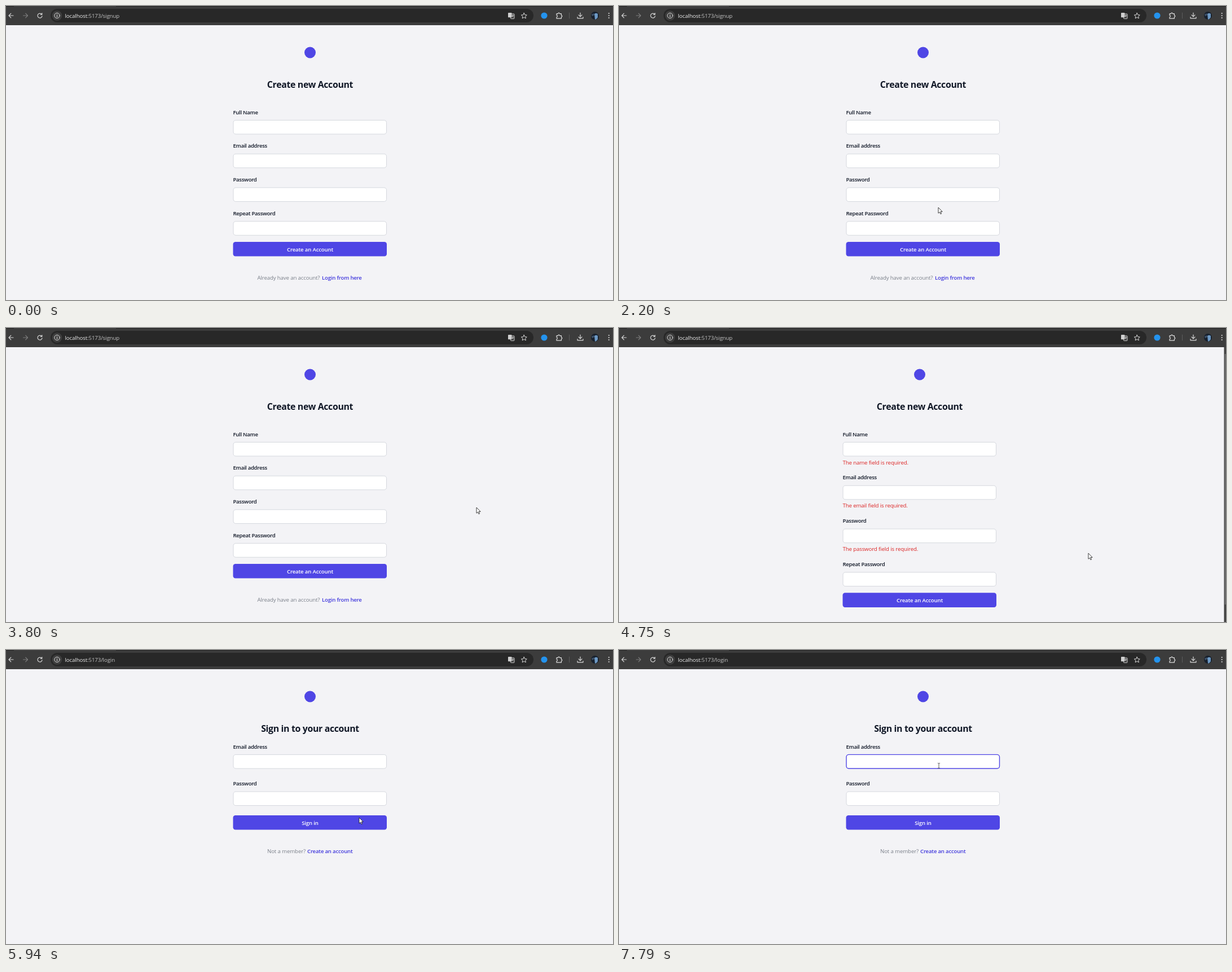
An HTML page for the animation above (8000 ms loop, 1076 by 521 pixels).

```html
<!DOCTYPE html>
<html lang="en">
<head>
<meta charset="utf-8">
<title>Sign up</title>
<style>
  html, body { margin: 0; width: 100%; height: 100%; overflow: hidden; background: #f3f3f6; }
  svg { display: block; width: 1076px; height: 521px; }
  text { font: 400 9.7px "Open Sans", "Noto Sans", sans-serif; letter-spacing: -.15px; white-space: pre; }
  .title { font-weight: 700; font-size: 15.9px; letter-spacing: -.35px; fill: #111827; text-anchor: middle; }
  .label { font-weight: 600; font-size: 9.6px; letter-spacing: -.3px; fill: #111827; }
  .caption { font-weight: 600; font-size: 9.6px; letter-spacing: -.16px; fill: #fff; text-anchor: middle; }
  .error { fill: #dc2626; }
  .note { fill: #7b808a; }
  .link { font-weight: 600; font-size: 9.6px; letter-spacing: -.2px; fill: #4038dd; }
  .input { fill: #fff; stroke: #d5d8de; }
  .input.focus { stroke: #4f46e5; stroke-width: 1.4; }
  .button { fill: #4f46e5; }
  .button.hover { fill: #6366f1; }
  .url { letter-spacing: -.12px; fill: #c4c4c4; }
  .url tspan { fill: #ededed; }
  .icon { fill: none; stroke: #dadada; stroke-width: 1.2; stroke-linecap: round; stroke-linejoin: round; }
  .off { display: none; }
</style>
</head>
<body>
<svg viewBox="0 0 1076 521">
  <rect width="1076" height="521" fill="#f3f3f6"/>
  <g id="pages"></g>

  <g id="bar" class="off">
    <rect x="1072.5" y="34" width="4" height="487" fill="#424242"/>
    <rect id="thumb" x="1073.5" y="46" width="3" height="444" fill="#686868"/>
  </g>

  <g id="toolbar">
    <rect width="1076" height="34" fill="#3c3c3c"/>
    <path d="M0 0H14V1H0zM195 0H1076V1H195z" fill="#202020"/>
    <rect x="79" y="5" width="856" height="24" rx="12" fill="#282828"/>
    <circle cx="90.5" cy="17" r="8.8" fill="#3e3e3e"/>
    <g class="icon">
      <path d="M13 17H5.2M8.8 13.2L5 17l3.800 3.800"/>
      <path d="M30.500 17h7.800M34.700 13.200l3.800 3.800-3.800 3.800" stroke="#7c7c7c"/>
      <path d="M63.200 14.600a4 4 0 1 0 .8 3.300M63.800 12.600v2.600h-2.600"/>
      <circle cx="90.500" cy="17" r="4.600" stroke-width="1"/>
      <path d="M90.500 16.700v2.500M90.500 14.700v.1"/>
      <path d="M918.300 12.300l1.500 3.300 3.500.4-2.600 2.400.7 3.500-3.100-1.800-3.100 1.800.7-3.500-2.600-2.400 3.500-.4z" stroke-width="1"/>
      <rect x="894.500" y="14" width="6.500" height="8.500" rx=".8" stroke-width="1"/>
      <path d="M896.500 16.700h3.500M898.300 15.700v1M899.300 16.700q-.6 2.200-2.600 3.300M897.200 17.500q.8 1.700 2.400 2.500" stroke-width=".8"/>
      <path d="M976 13.600h2.600a1.400 1.400 0 0 1 2.800 0h3v3a1.400 1.400 0 0 1 0 2.800v2.800H976v-2.700a1.500 1.500 0 0 0 0-3z"/>
      <path d="M998.500 12v10" stroke="#5c5c5c" stroke-width="1"/>
      <path d="M1018 12v6.500M1015 15.800l3 3 3-3M1013 19.500v2.300h10v-2.300"/>
    </g>
    <rect x="890" y="12" width="6.500" height="8.300" rx=".8" fill="#cfcfcf"/>
    <circle cx="954" cy="17" r="5.600" fill="#2493ee"/>
    <circle cx="1044" cy="17" r="7" fill="#17202d"/>
    <path d="M1043 14a4 4 0 0 1 6 0v6q-2 3.500-5 3.700z" fill="#6d99c4"/>
    <path d="M1038 15l4-2 1 3-4 2z" fill="#40536a"/>
    <g fill="#dadada"><circle cx="1068.700" cy="13" r="1.100"/><circle cx="1068.700" cy="17" r="1.100"/><circle cx="1068.700" cy="21" r="1.100"/></g>
    <text class="url" x="104.500" y="20.800"><tspan>localhost</tspan>:5173/<tspan id="route" style="fill:inherit">signup</tspan></text>
  </g>

  <rect id="caret" class="off" x="411" y="191" width="1" height="13" fill="#111827"/>
  <circle id="press" class="off" r="8" fill="#e2d32c" opacity=".78"/>
  <g id="cursor" stroke="#111" stroke-width=".8" stroke-linejoin="round" fill="#fff">
    <path id="arrow" d="M0 0V10.200L2.400 8.200 4 11.700 5.600 11 4 7.400H7.200z"/>
    <path id="hand" d="M-1.200 1.200a1.100 1.100 0 0 1 2.200 0V5.400l3.600.8q1.400.4 1.200 2l-.6 3.400q-.2 1.400-.9 2.200H-.2q-.9-1.600-2.300-3.200t-1.500-2.600 1.600-.2l1.200 1z"/>
    <path id="beam" d="M-2-4.500Q0-4.500 0-3.500 0-4.500 2-4.500M0-3.500V3.500M-2 4.500Q0 4.500 0 3.500 0 4.500 2 4.500" fill="none" stroke="#333"/>
  </g>
</svg>

<script>
const LOOP = 8000, MAX_SCROLL = 21.6, LEFT = 402.5, WIDTH = 272.5, FIELD_H = 25.6;
const $ = id => document.getElementById(id);

const text = (cls, x, y, s) => `<text class="${cls}" x="${x}" y="${y}">${s}</text>`;
const box = (cls, y, stroke) => {
  const d = stroke ? .5 : 0;
  return `<rect class="${cls}" x="${LEFT + d}" y="${y + d}" width="${WIDTH - 2 * d}" height="${FIELD_H - 2 * d}" rx="4.200"/>`;
};

// Each page keeps its own hit areas, [kind, x, y, width, height].
function makePage(o) {
  const hits = [['button', LEFT, o.button, WIDTH, FIELD_H], ['link', o.linkX, o.note - 8, o.linkW, 17]];
  let html = `<circle cx="539" cy="82.500" r="10" fill="#4f46e5"/>` + text('title', 539, 144.6, o.title);
  o.fields.forEach((name, i) => {
    const y = o.top + i * o.step;
    html += text('label', LEFT, y + 3.6, name) + box('input', y + 13.9, true);
    hits.push(['input', LEFT, y + 13.9, WIDTH, FIELD_H]);
    if (o.errors && o.errors[i]) html += text('error', LEFT, y + 53.6, `The ${o.errors[i]} field is required.`);
  });
  html += box('button', o.button) + text('caption', 539, o.button + 17, o.caption);
  html += text('note', o.noteX, o.note + 3.6, o.ask) + text('link', o.linkX, o.note + 3.6, o.link);
  const g = document.createElementNS('http://www.w3.org/2000/svg', 'g');
  g.innerHTML = html;
  $('pages').append(g);
  return { g, hits, dx: o.errors ? -6 : 0, button: g.querySelector('.button'), input: g.querySelector('.input') };
}

const signup = {
  title: 'Create new Account', fields: ['Full Name', 'Email address', 'Password', 'Repeat Password'],
  top: 188, step: 59.75, button: 418, caption: 'Create an Account',
  note: 481, noteX: 445.5, ask: 'Already have an account?', linkX: 560, linkW: 73, link: 'Login from here'
};
const pages = {
  signup: makePage(signup),
  invalid: makePage({ ...signup, step: 76.85, button: 469.3, note: 532.2, errors: ['name', 'email', 'password'] }),
  login: makePage({
    title: 'Sign in to your account', fields: ['Email address', 'Password'],
    top: 171, step: 65.6, button: 293, caption: 'Sign in',
    note: 356, noteX: 463, ask: 'Not a member?', linkX: 534, linkW: 81, link: 'Create an account'
  })
};

const views = [[0, 'signup'], [1320, 'login'], [2140, 'signup'], [4030, 'invalid'], [5740, 'login']];
const routes = [[0, 'signup'], [1360, 'login'], [2200, 'signup'], [5800, 'login']];
const presses = [[1260, 1320], [2080, 2140], [2900, 3140], [5680, 5740], [7180, 7300]];

// Pointer path: time, x, y
const path = [
  [230, 1032, 530], [420, 985, 466], [600, 760, 438], [720, 640, 431], [960, 598, 474],
  [1680, 598, 474], [2060, 566, 357], [2360, 566, 357], [2640, 563, 443], [2820, 562, 433],
  [3170, 562, 433], [3400, 720, 452], [3560, 872, 490], [3800, 834, 318], [4030, 834, 318],
  [4750, 832, 399], [4840, 812, 412], [5070, 665, 468], [5300, 602, 504], [5550, 590, 506],
  [5740, 590, 506], [5940, 626, 297], [6200, 604, 330], [6470, 580, 354], [6520, 580, 354],
  [7000, 566, 250], [7200, 567, 205], [8000, 567, 205]
];

const current = (list, t) => list.filter(([at]) => at <= t).pop()[1];
const clamp = v => Math.min(1, Math.max(0, v));

function slope(i, k) {
  const a = path[i - 1], b = path[i], c = path[i + 1];
  if (!a || !c || (b[k] - a[k]) * (c[k] - b[k]) <= 0) return 0;
  return (c[k] - a[k]) / (c[0] - a[0]);
}

function pointer(t) {
  if (t < path[0][0]) return [path[0][1], path[0][2]];
  const i = Math.min(path.findLastIndex(p => p[0] <= t), path.length - 2);
  const a = path[i], b = path[i + 1], d = b[0] - a[0], u = (t - a[0]) / d;
  const ease = u * u * (3 - 2 * u);
  return [1, 2].map(k => a[k] + (b[k] - a[k]) * ease
    + d * u * (1 - u) * (slope(i, k) * (1 - u) - slope(i + 1, k) * u));
}

const show = (el, on) => el.classList.toggle('off', !on);

function draw(t) {
  const view = current(views, t), page = pages[view], invalid = view === 'invalid';
  const s = 1 - clamp((t - 4840) / 180);
  const scroll = invalid ? MAX_SCROLL * (1 - s * s) : 0;
  const [x, y] = pointer(t);

  for (const name in pages) show(pages[name].g, name === view);
  page.g.setAttribute('transform', `translate(${page.dx} ${-scroll})`);
  show($('bar'), invalid);
  $('thumb').setAttribute('y', 46 + scroll * .91);
  $('route').textContent = current(routes, t);

  // The pointer state refreshes shortly after the last page change.
  const settled = t < 5740 || t > 5975;
  const hit = settled && page.hits.find(([, hx, hy, w, h]) =>
    x >= hx + page.dx && x <= hx + page.dx + w && y >= hy - scroll && y <= hy - scroll + h);
  const kind = hit ? hit[0] : '';
  page.button.classList.toggle('hover', kind === 'button');
  page.input.classList.toggle('focus', t >= 7220 && view === 'login');
  show($('caret'), t >= 7280 && t < 7790);

  show($('hand'), kind === 'button' || kind === 'link');
  show($('beam'), kind === 'input');
  show($('arrow'), !kind);
  $('cursor').setAttribute('transform', `translate(${x} ${y})`);
  show($('cursor'), t >= 230);
  show($('press'), presses.some(([a, b]) => t >= a && t < b));
  $('press').setAttribute('transform', `translate(${x - .5} ${y + 2.5})`);
}

const start = performance.now();
function tick() {
  draw((performance.now() - start) % LOOP);
  requestAnimationFrame(tick);
}
tick();
</script>
</body>
</html>
```
